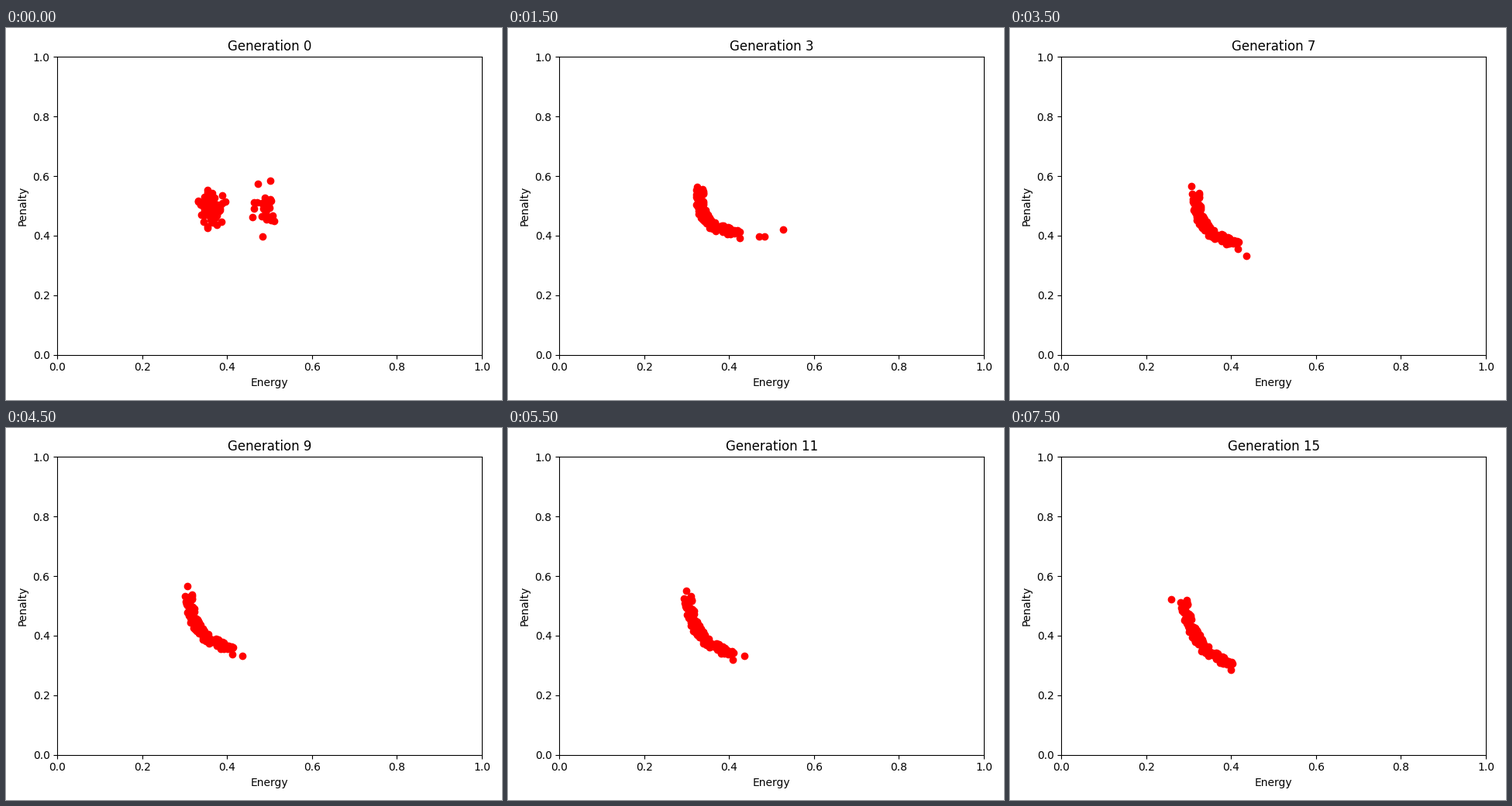
Animation of 640 by 480 pixels, one loop 8 s. Source, as a matplotlib script:

```python
import numpy as np
import matplotlib.pyplot as plt
from matplotlib.animation import FuncAnimation

GENERATIONS = 16
N_LEFT, N_RIGHT = 66, 24
N = N_LEFT + N_RIGHT
SPREAD = 5.5
FORMED = 3  # generation by which the front has formed

# Bezier control points of the front, in stage pixels.
FRONT_FORMED = np.array([(248, 208), (238, 259), (300, 266)])
FRONT_FINAL = np.array([(224, 222), (230, 285), (288, 308)])

# Individuals away from the crowd: x, y, first and last generation.
APART = [(355, 260, 2, 3), (331, 269, 0, 5), (324, 269, 2, 5),
         (244, 205, 3, 6), (234, 204, 7, 9), (230, 210, 10, 11),
         (305, 294, 7, 12), (208, 221, 15, 15)]

rng = np.random.default_rng(12)
along = ((np.arange(N) + rng.random(N)) / N)[:, None]
across = rng.uniform(-SPREAD, SPREAD, (N, 1))
start = np.vstack([rng.normal((264, 231), (7, 13), (N_LEFT, 2)),
                   rng.normal((335, 231), (7, 14), (N_RIGHT, 2))])


def front(gen):
    t = (gen - FORMED) / (GENERATIONS - 1 - FORMED)
    a, b, c = FRONT_FORMED + (FRONT_FINAL - FRONT_FORMED) * t
    u = along
    spine = (1 - u) ** 2 * a + 2 * u * (1 - u) * b + u ** 2 * c
    slope = (1 - u) * (b - a) + u * (c - b)
    normal = slope[:, ::-1] * (-1, 1)
    return spine + across * normal / np.linalg.norm(normal, axis=1)[:, None]


def population(gen):
    mix = min(gen / FORMED, 1)
    crowd = start + (front(max(gen, FORMED)) - start) * mix
    apart = [(x, y) for x, y, first, last in APART if first <= gen <= last]
    x, y = np.vstack([crowd, *apart]).T
    return (x - 66) / 548, (422 - y) / 384


fig, ax = plt.subplots(figsize=(6.4, 4.8), dpi=100)
dots, = ax.plot([], [], "ro")
ax.set(xlim=(0, 1), ylim=(0, 1), xlabel="Energy", ylabel="Penalty")
title = ax.set_title("Generation 0")
fig.tight_layout()


def update(gen):
    dots.set_data(*population(gen))
    title.set_text(f"Generation {gen}")
    return dots, title


anim = FuncAnimation(fig, update, frames=GENERATIONS, interval=500,
                     repeat=True, repeat_delay=0)
plt.show()
```
